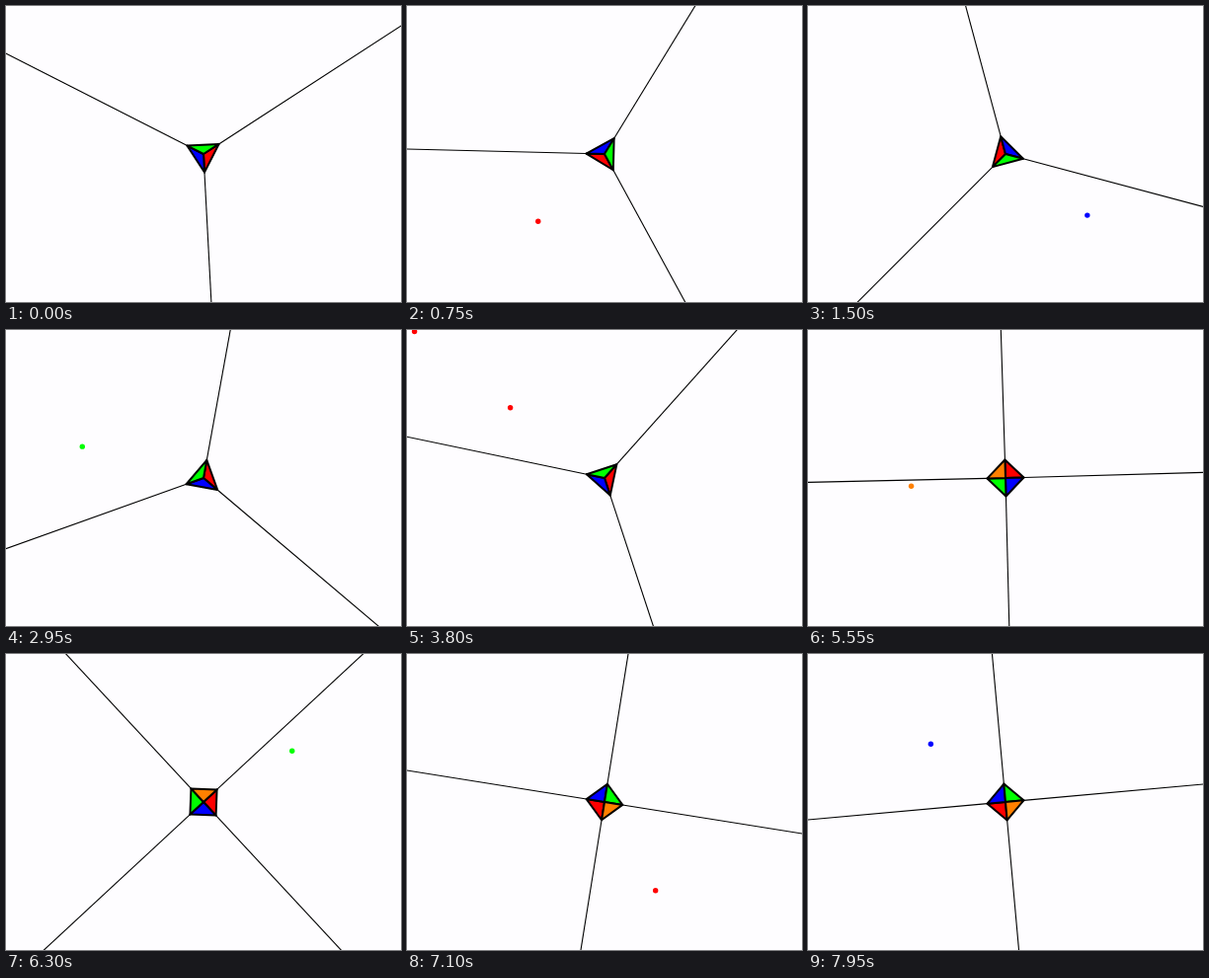
Animation, 400 px wide and 300 px high, one loop 8000 ms. Source, as an HTML page:

```html
<!DOCTYPE html>
<html lang="en">
<head>
<meta charset="utf-8">
<title>Spinning colour core</title>
<style>
html, body { margin: 0; width: 100%; height: 100%; overflow: hidden; background: #fefdff; }
svg { display: block; width: 100vw; height: 100vh; }
</style>
</head>
<body>
<svg viewBox="0 0 400 300">
  <g id="dots"></g>
  <g id="rays" stroke="#000" stroke-width="1.1"></g>
  <g id="core" stroke="#000" stroke-width="2" stroke-linejoin="round"></g>
</svg>
<script>
const LOOP = 8000, BEAT = 800, FIRST = 1369;
const SPEED = 0.155;       // dot speed, px per ms
const SPIN = 0.06;         // world rotation, degrees per ms
const LAG = 480;           // time constant of the core's turning
const REACT = 33;          // pause between a hit and the next turn
const SPLIT = 4582, GROW = 188;
const RADIUS = 18.5, START = 26.8;
const RED = '#f00', BLUE = '#00f', GREEN = '#0f0', ORANGE = '#ff8000';
const COLORS = [RED, BLUE, GREEN, ORANGE];

// One dot per beat: colour, lane, and where the red side turns to meet it
const beats = [
  [RED, 89.5, 89.5],
  [BLUE, -53.2, 186.8],
  [GREEN, 42, 162],
  [GREEN, 17.5, 139.2],
  [RED, -11.3, -11],
  [RED, -10.4, -10.5],
  [ORANGE, -158, -60.1],
  [GREEN, -48, 131.5],
  [RED, -6, -6],
  [BLUE, 100.8, 10.8]
].map(([color, lane, target], i) => ({ color, lane, target, hit: FIRST + i * BEAT }));

function add(parent, name, attrs = {}) {
  const el = document.createElementNS('http://www.w3.org/2000/svg', name);
  set(el, attrs);
  return document.getElementById(parent).appendChild(el);
}

function set(el, attrs) {
  for (const key in attrs) el.setAttribute(key, attrs[key]);
}

function polar(deg, r) {
  const a = deg * Math.PI / 180;
  return [200 + r * Math.cos(a), 150 + r * Math.sin(a)];
}

const dots = beats.map(b => add('dots', 'circle', { r: 2.7, fill: b.color }));
const rays = COLORS.map(() => add('rays', 'line'));
const sides = COLORS.map(fill => add('core', 'polygon', { fill }));

// Angle of the red side, easing towards one target after another
function heading(t) {
  let angle = START, from = 0;
  for (const { target, hit } of beats) {
    const until = hit + REACT;
    const span = Math.min(t, until) - from;
    angle = target + (angle - target) * Math.exp(-span / LAG);
    if (t <= until) break;
    from = until;
  }
  return angle;
}

function draw(t) {
  const world = SPIN * t;
  const extra = t > SPLIT ? 90 * (1 - Math.exp((SPLIT - t) / GROW)) : 0;
  const width = (360 - extra) / 3;
  let edge = heading(t) + world - width / 2;

  sides.forEach((side, i) => {
    const next = edge + (i < 3 ? width : extra);
    const visibility = i < 3 || extra > 0 ? 'visible' : 'hidden';
    const [x1, y1] = polar(edge, RADIUS);
    const [x2, y2] = polar(edge, 400);
    set(side, { points: `200,150 ${x1},${y1} ${polar(next, RADIUS)}`, visibility });
    set(rays[i], { x1, y1, x2, y2, visibility });
    edge = next;
  });

  beats.forEach((b, i) => {
    const dist = (b.hit - t) * SPEED;
    const [cx, cy] = polar(b.lane + world, dist);
    set(dots[i], { cx, cy, visibility: dist > 0 ? 'visible' : 'hidden' });
  });
}

const begin = performance.now();
function tick() {
  draw((performance.now() - begin) % LOOP);
  requestAnimationFrame(tick);
}
draw(0);
requestAnimationFrame(tick);
</script>
</body>
</html>
```
